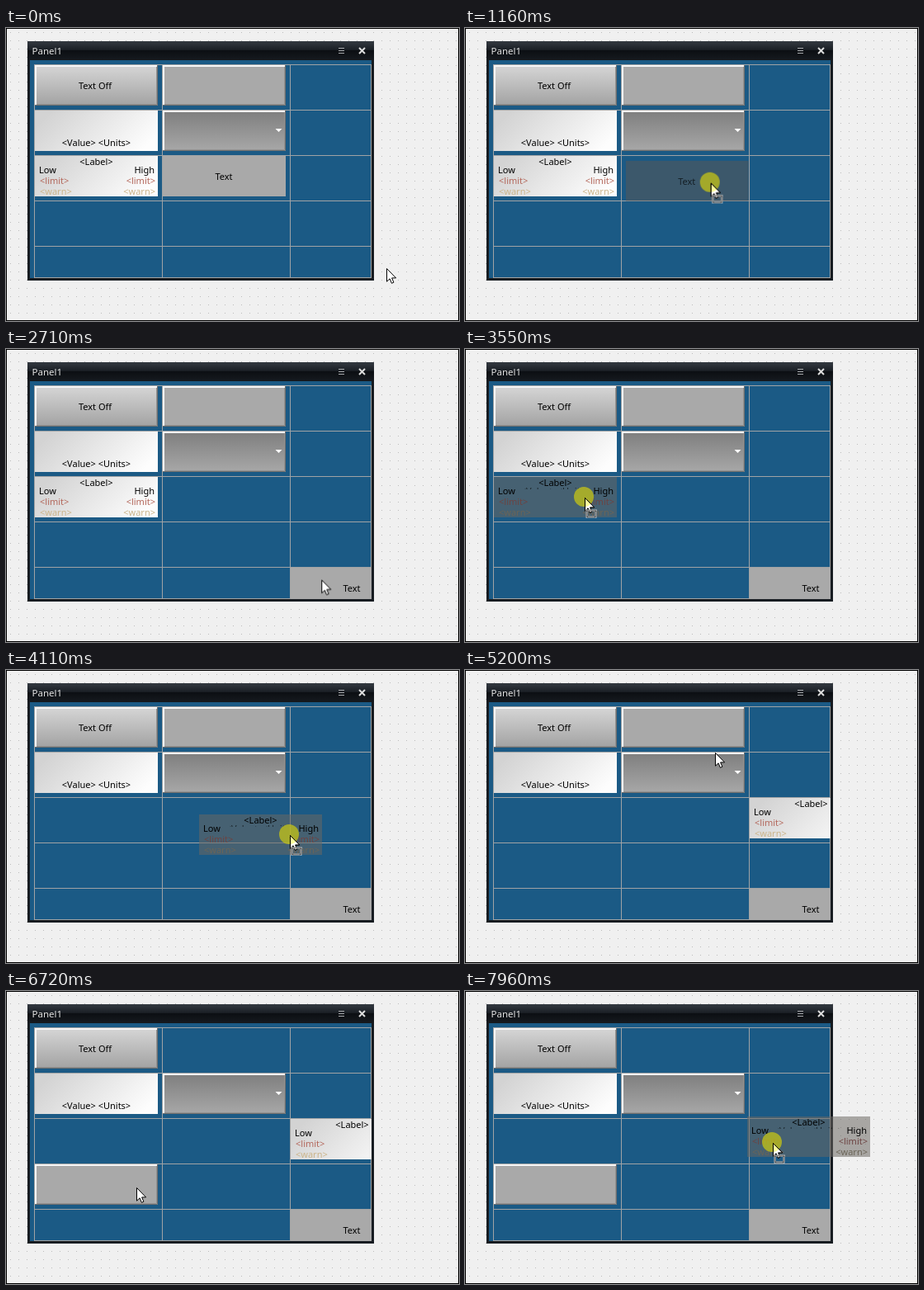
Animation, 549 px wide and 355 px high, one loop 8000 ms. Source, as an HTML page:

```html
<!DOCTYPE html>
<html lang="en">
<head>
<meta charset="utf-8">
<title>Panel layout</title>
<style>
html, body { margin: 0; width: 100%; height: 100%; overflow: hidden; background: #f0f0f0; }
svg { display: block; width: 549px; height: 355px; }
text { font: 11px "Noto Sans", "Open Sans", sans-serif; fill: #000; }
.mid { text-anchor: middle; }
.end { text-anchor: end; }
.limit { fill: var(--limit, #b4685c); }
.warn { fill: var(--warn, #cbb48a); }
.ghost { --limit: #6d4443; --warn: #6b6558; }
.ghost use { opacity: .65; }

/* One 8 s clock: state changes are hard, the pointer advances in short steps. */
.state, .pointer { animation: 8s step-end infinite; }
.pointer { animation-name: travel; animation-timing-function: steps(4); }
.press { animation-name: press; }
.badge { animation-name: badge; }
.text-widget { animation-name: text-widget; }
.gauge { animation-name: gauge; }
.blank { animation-name: blank; }
.drag-text { animation-name: drag-text; }
.drag-gauge { animation-name: drag-gauge; }
.drag-blank { animation-name: drag-blank; }
.drag-last { animation-name: drag-last; }

@keyframes travel {
  0%, 2.375% { transform: translate(461px, 291px); }
  5.875% { transform: translate(436px, 275px); }
  9.375% { transform: translate(353px, 216px); }
  12.75% { transform: translate(297px, 185px); }
  13.625% { transform: translate(293px, 182px); }
  17.125% { transform: translate(312px, 205px); }
  21.375% { transform: translate(364px, 261px); }
  23% { transform: translate(386px, 281px); }
  24.875%, 33% { transform: translate(393px, 286px); }
  36.5% { transform: translate(350px, 260px); }
  40% { transform: translate(215px, 200px); }
  43.5%, 44.375% { transform: translate(145px, 180px); }
  47.875% { transform: translate(220px, 186px); }
  51.375% { transform: translate(344px, 200px); }
  54% { transform: translate(374px, 193px); }
  58.25%, 60.75% { transform: translate(393px, 186px); }
  65% { transform: translate(303px, 100px); }
  69.375%, 71.25% { transform: translate(285px, 73px); }
  75.5% { transform: translate(195px, 200px); }
  80.625% { transform: translate(164px, 237px); }
  83.25%, 86.5% { transform: translate(158px, 238px); }
  90% { transform: translate(190px, 228px); }
  93.5% { transform: translate(300px, 198px); }
  97% { transform: translate(374px, 185px); }
  97.75% { transform: translate(376px, 187px); }
  99.5%, 100% { transform: translate(373px, 184px); }
}
@keyframes press {
  0%, 28.125%, 59.125%, 84% { opacity: 0; }
  13.625%, 43.5%, 71.25%, 97.75%, 100% { opacity: 1; }
}
@keyframes badge {
  0%, 28.125%, 59.125%, 84% { opacity: 0; }
  13.625%, 44.375%, 71.25%, 97.75%, 100% { opacity: 1; }
}
@keyframes text-widget {
  0% { transform: translate(190px, 155px); opacity: 1; }
  13.625% { transform: translate(190px, 155px); opacity: 0; }
  28.125%, 100% { transform: translate(345px, 265px); opacity: 1; }
}
@keyframes gauge {
  0% { transform: translate(35px, 155px); opacity: 1; }
  44.375% { transform: translate(35px, 155px); opacity: 0; }
  59.125% { transform: translate(345px, 155px); opacity: 1; }
  97.75%, 100% { transform: translate(345px, 155px); opacity: 0; }
}
@keyframes blank {
  0% { transform: translate(190px, 45px); opacity: 1; }
  71.25% { transform: translate(190px, 45px); opacity: 0; }
  84%, 100% { transform: translate(35px, 210px); opacity: 1; }
}
@keyframes drag-text { 0%, 28.125%, 100% { opacity: 0; } 13.625% { opacity: 1; } }
@keyframes drag-gauge { 0%, 59.125%, 100% { opacity: 0; } 44.375% { opacity: 1; } }
@keyframes drag-blank { 0%, 84%, 100% { opacity: 0; } 71.25% { opacity: 1; } }
@keyframes drag-last { 0% { opacity: 0; } 97.75%, 100% { opacity: 1; } }
</style>
</head>
<body>
<svg viewBox="0 0 549 355">
  <defs>
    <pattern id="dots" width="10" height="10" patternUnits="userSpaceOnUse">
      <rect x="5" y="5" width="1" height="1" fill="#bcbcbc"/>
    </pattern>
    <linearGradient id="bar" x2="0" y2="1">
      <stop stop-color="#343a41"/><stop offset=".45" stop-color="#1b2026"/>
      <stop offset=".5" stop-color="#0c0f13"/><stop offset="1" stop-color="#161a1f"/>
    </linearGradient>
    <linearGradient id="raised" x2="0" y2="1">
      <stop stop-color="#d6d6d6"/><stop offset="1" stop-color="#a2a2a2"/>
    </linearGradient>
    <linearGradient id="sunken" x2="0" y2="1">
      <stop stop-color="#7e7e7e"/><stop offset="1" stop-color="#a8a8a8"/>
    </linearGradient>
    <linearGradient id="sheen" gradientUnits="userSpaceOnUse" x1="35" y1="-15" x2="114" y2="64">
      <stop stop-color="#d3d3d3"/><stop offset="1" stop-color="#fdfdfd"/>
    </linearGradient>
    <radialGradient id="tint" gradientUnits="userSpaceOnUse" cx="-1" cy="-1" r="12.5">
      <stop offset=".95" stop-color="#ffff9c"/><stop offset="1" stop-color="#fff"/>
    </radialGradient>
    <clipPath id="area"><rect x="34" y="44" width="409" height="259"/></clipPath>
    <clipPath id="cell"><rect width="149" height="49"/></clipPath>
    <clipPath id="sliver"><rect y="12" width="149" height="3"/></clipPath>

    <g id="bevel" fill="none" stroke-width="2">
      <path d="M148.5 0V48.5H0" stroke="#6f6f6f" stroke-width="1"/>
      <path d="M147.5 2V47.5H2" stroke="#929292" stroke-width="1"/>
      <path d="M1 48V1H148" stroke="#f6f6f6"/>
    </g>
    <g id="gauge-text" clip-path="url(#cell)">
      <text class="mid" x="74.5" y="11">&lt;Label&gt;</text>
      <text x="5" y="21">Low</text>
      <text class="end" x="145" y="21">High</text>
      <text class="limit" x="6" y="34">&lt;limit&gt;</text>
      <text class="limit end" x="146" y="34">&lt;limit&gt;</text>
      <text class="warn" x="6" y="47">&lt;warn&gt;</text>
      <text class="warn end" x="146" y="47">&lt;warn&gt;</text>
    </g>
    <g id="gauge-ghost">
      <rect width="149" height="49" fill="#6b6862" opacity=".54"/>
      <use href="#gauge-text"/>
      <g clip-path="url(#sliver)" opacity=".6">
        <text class="mid" x="74.5" y="21">&lt;Value&gt; &lt;Units&gt;</text>
      </g>
    </g>
    <path id="arrow" d="M.5 .5V16.2L4.1 12.8 6.4 18.3 8.9 17.2 6.6 11.9H11.6Z"/>
  </defs>

  <rect width="549" height="355" fill="#f0f0f0"/>
  <rect width="549" height="355" fill="url(#dots)"/>
  <rect x=".5" y=".5" width="548" height="354" fill="none" stroke="#000"/>

  <!-- window -->
  <rect x="26" y="16" width="420" height="290" fill="#171c21"/>
  <rect x="26" y="16" width="420" height="23" fill="url(#bar)"/>
  <rect x="29" y="39" width="414" height="264" fill="#1b5a85"/>
  <text x="31.500" y="32" style="font-size:11.5px;fill:#e4e4e4">Panel1</text>
  <path d="M403 24.500H410M403 27.500H410M403 30.500H410" stroke="#a8abae"/>
  <path d="M428 24L435 31M435 24L428 31" stroke="#dcdcdc" stroke-width="2"/>
  <path d="M34 44.500H443M34 99.500H443M34 154.500H443M34 209.500H443M34 264.500H443M34 302.500H443M34.500 44V303M189.500 44V303M344.500 44V303M442.500 44V303"
    fill="none" stroke="#a0a3a5"/>

  <!-- widgets -->
  <g clip-path="url(#area)">
    <g transform="translate(35 45)">
      <rect width="149" height="49" fill="url(#raised)"/>
      <use href="#bevel"/>
      <text class="mid" x="73" y="29">Text Off</text>
    </g>
    <g transform="translate(35 100)">
      <rect width="149" height="49" fill="url(#sheen)"/>
      <text class="mid" x="74.5" y="43">&lt;Value&gt; &lt;Units&gt;</text>
    </g>
    <g transform="translate(190 100)">
      <rect width="149" height="49" fill="url(#sunken)"/>
      <use href="#bevel"/>
      <path d="M136.500 22H144.500L140.500 26Z" fill="#fff"/>
    </g>
    <g class="state blank">
      <rect width="149" height="49" fill="#a9a9a9"/>
      <use href="#bevel"/>
    </g>
    <g class="state gauge">
      <rect width="149" height="49" fill="url(#sheen)"/>
      <use href="#gauge-text"/>
    </g>
    <g class="state text-widget">
      <rect width="149" height="49" fill="#a9a9a9"/>
      <text class="mid" x="74" y="29">Text</text>
    </g>
  </g>

  <!-- pointer and whatever it carries -->
  <g class="pointer">
    <g class="state drag-text"><g transform="translate(-103 -27)">
      <rect width="149" height="49" fill="#5a5855" opacity=".54"/>
      <text class="mid" x="74" y="29" opacity=".65">Text</text>
    </g></g>
    <g class="state ghost drag-gauge"><use href="#gauge-ghost" x="-110" y="-25" style="opacity:1"/></g>
    <g class="state drag-blank"><g transform="translate(-95 -28)">
      <rect width="149" height="49" fill="#5a5855" opacity=".54"/>
      <rect x=".5" y=".5" width="148" height="48" fill="none" stroke="#4c5357" opacity=".7"/>
    </g></g>
    <g class="state ghost drag-last"><use href="#gauge-ghost" x="-31" y="-32" style="opacity:1"/></g>
    <circle class="state press" cx="-1" cy="-1" r="12" fill="#c4c216" fill-opacity=".76"/>
    <use href="#arrow" fill="#fff" stroke="#000"/>
    <use class="state press" href="#arrow" fill="url(#tint)" stroke="#000"/>
    <g class="state badge" fill="none">
      <rect x="2.500" y="15.500" width="11" height="8" stroke="#fff" stroke-width="2"/>
      <rect x="2.500" y="15.500" width="11" height="8" stroke="#111" stroke-width="2" stroke-dasharray="1 1"/>
    </g>
  </g>
</svg>
</body>
</html>
```
